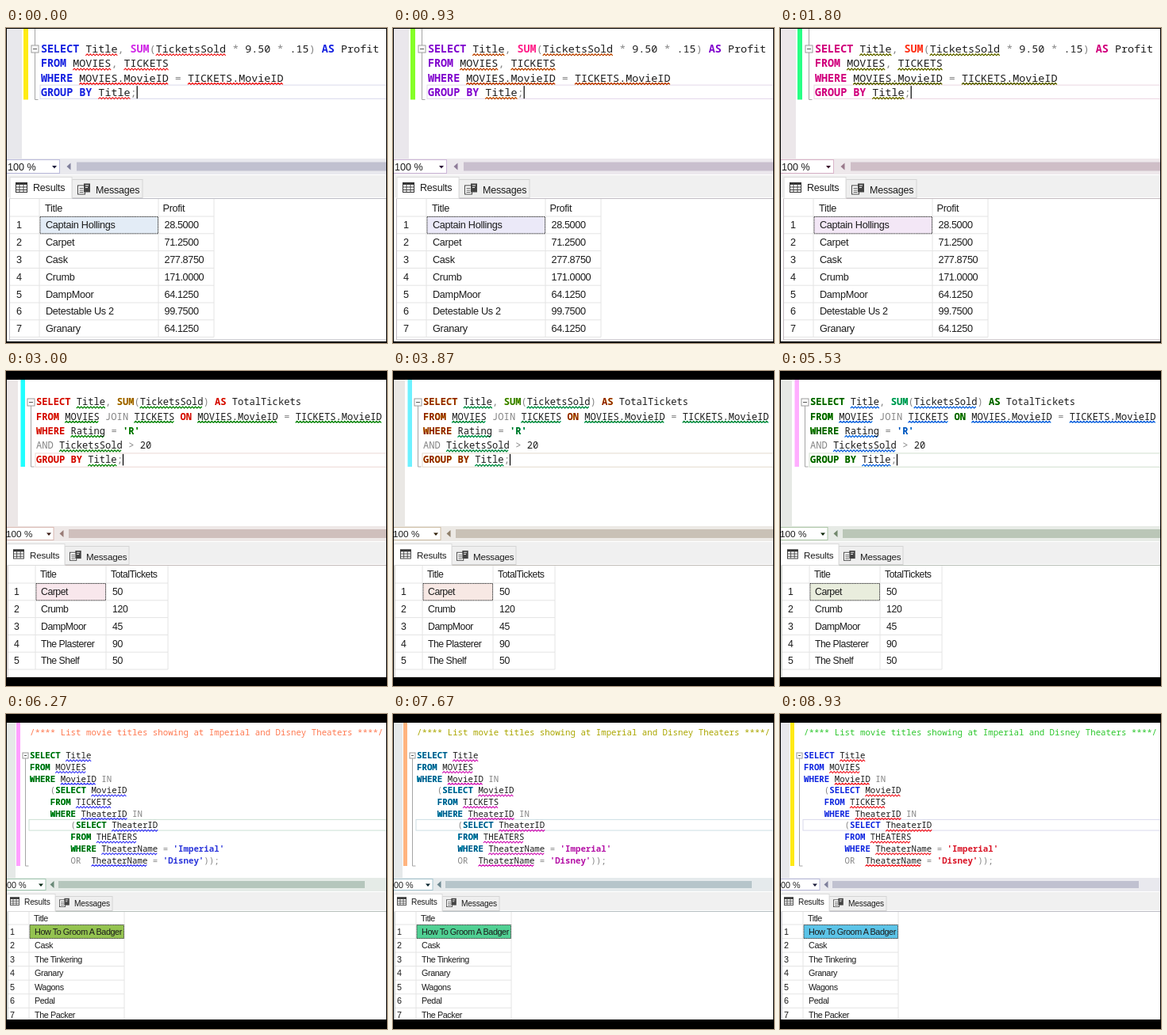
These frames come from a looping animation (480 px wide and 398 px high, 8990 ms). An HTML page:

```html
<!DOCTYPE html>
<html lang="en">
<head>
<meta charset="utf-8">
<title>SQL queries</title>
<style>
  html, body { margin: 0; width: 100%; height: 100%; overflow: hidden; background: #fff; }
  svg { display: block; width: 480px; height: 398px; }
  text { white-space: pre; }
  .code { font-family: "Noto Sans Mono", monospace; font-weight: 500; }
  .ui { font-family: "Liberation Sans", Arial, sans-serif; fill: #1c1c1c; }
  .keyword { fill: #1420e0; font-weight: 600; }
  .func { fill: #d028e6; font-weight: 600; }
  .op { fill: #858585; }
  .string { fill: #d8141e; font-weight: 600; }
  .comment { fill: #28c832; }
  .plain, .name { fill: #1c1c1c; }
</style>
</head>
<body>
<svg id="stage" viewBox="0 0 480 398"></svg>
<script>
const LOOP = 8990, STEPS = 135;

const slides = [
  {
    top: 1, bottom: 396,
    code: { x: 44, y: 31, size: 13.4, pitch: 18.3, caret: true, current: 3, lines: [
      "SELECT Title, SUM(TicketsSold * 9.50 * .15) AS Profit",
      "FROM MOVIES, TICKETS",
      "WHERE MOVIES.MovieID = TICKETS.MovieID",
      "GROUP BY Title;"] },
    gutter: 20, bar: [22, 6], fold: [36.5, 26.5, 4.5, 90.5], foldAbove: true,
    zoom: { y: 165, h: 20, text: 2, size: 12.6, combo: 67.5, arrow: 61, left: 79, thumb: [89, 479], thumbY: [169.5, 11] },
    tabs: { y: 186, bottom: 214, split: [5, 83, 172], text: [34, 113], base: [206, 208.5],
            icon: [12, 90], iconY: 195, scale: 1, size: 12.5 },
    table: { y: 216, head: 22, pitch: 21.8, cols: [4.5, 42, 192, 262], text: [13, 49, 197.5], size: 12.7, gap: -.3, numGap: -.4,
      frameBottom: 394, pick: "#e3ecf6", header: ["Title", "Profit"], rows: [
      ["Captain Hollings", "28.5000"], ["Carpet", "71.2500"], ["Cask", "277.8750"], ["Crumb", "171.0000"],
      ["DampMoor", "64.1250"], ["Detestable Us 2", "99.7500"], ["Granary", "64.1250"]] }
  },
  {
    top: 11, bottom: 387,
    code: { x: 38, y: 43.2, size: 12.1, pitch: 18.3, caret: true, current: 4, lines: [
      "SELECT Title, SUM(TicketsSold) AS TotalTickets",
      "FROM MOVIES JOIN TICKETS ON MOVIES.MovieID = TICKETS.MovieID",
      "WHERE Rating = 'R'",
      "AND TicketsSold > 20",
      "GROUP BY Title;"] },
    gutter: 15, bar: [18.5, 5.5], fold: [31.5, 39.5, 4.5, 121],
    zoom: { y: 196, h: 19, text: 0, size: 11.8, combo: 60, arrow: 54, left: 70, thumb: [79, 479], thumbY: [200, 11] },
    tabs: { y: 216, bottom: 244, split: [1, 74, 155], text: [30, 101], base: [236.5, 239],
            icon: [9, 80], iconY: 225.5, scale: .92, size: 11.6 },
    table: { y: 246, head: 22, pitch: 21.8, cols: [2, 37, 126, 204], text: [10, 43, 132], size: 12.3, gap: -.5, numGap: -.4,
      frameBottom: 387, pick: "#e3ecf6", header: ["Title", "TotalTickets"], rows: [
      ["Carpet", "50"], ["Crumb", "120"], ["DampMoor", "45"], ["The Plasterer", "90"], ["The Shelf", "50"]] }
  },
  {
    top: 11, bottom: 386,
    code: { x: 30, y: 26.6, size: 10.75, pitch: 14.73, current: 8, lines: [
      "/**** List movie titles showing at Imperial and Disney Theaters ****/",
      "",
      "SELECT Title",
      "FROM MOVIES",
      "WHERE MovieID IN",
      "    (SELECT MovieID",
      "    FROM TICKETS",
      "    WHERE TheaterID IN",
      "        (SELECT TheaterID",
      "        FROM THEATERS",
      "        WHERE TheaterName = 'Imperial'",
      "        OR  TheaterName = 'Disney'));"] },
    gutter: 12, bar: [13, 5], fold: [24.5, 52.5, 3.5, 192],
    zoom: { y: 207, h: 17, text: -5, size: 10.8, combo: 50, arrow: 44, left: 58, thumb: [66, 452], thumbY: [211, 9] },
    tabs: { y: 225, bottom: 248, split: [1, 62, 134], text: [23, 86], base: [241, 242.5],
            icon: [5, 67], iconY: 231.5, scale: .8, size: 10.2 },
    table: { y: 250, head: 16, pitch: 17.55, cols: [2, 29, 149], text: [5, 35], size: 10.8, gap: -.42, numGap: -.4,
      frameBottom: 387, pick: "#5fc3ec", header: ["Title"], rows: [
      ["How To Groom A Badger"], ["Cask"], ["The Tinkering"], ["Granary"], ["Wagons"], ["Pedal"], ["The Packer"]] }
  }
];

const rect = (x, y, w, h, fill, extra = "") =>
  `<rect x="${x}" y="${y}" width="${w}" height="${h}" fill="${fill}" ${extra}/>`;
const path = (d, stroke, width = 1) => `<path d="${d}" fill="none" stroke="${stroke}" stroke-width="${width}"/>`;
const shape = (d, fill) => `<path d="${d}" fill="${fill}"/>`;
const label = (x, y, size, str, gap = -.2) =>
  `<text class="ui" x="${x}" y="${y}" font-size="${size}" letter-spacing="${gap}">${str}</text>`;
const escape = s => s.replace(/&/g, "&amp;").replace(/</g, "&lt;").replace(/>/g, "&gt;");

const TOKENS = new RegExp([
  "(?<comment>/\\*.*\\*/)", "(?<string>'[^']*')",
  "(?<keyword>\\b(?:SELECT|FROM|WHERE|GROUP BY|AS|ON)\\b)", "(?<func>\\bSUM\\b)",
  "(?<op>\\b(?:AND|OR|IN|JOIN)\\b|[(),;=*>]+)",
  "(?<plain>(?<=AS )\\w+|[\\d.]+)", "(?<name>[A-Za-z][\\w.]*)"
].join("|"), "g");

function squiggle(x, y, width) {
  let d = `M${x} ${y + 1}`;
  for (let i = 1; i * 2 <= width; i++) d += `L${x + i * 2} ${y + (i % 2 ? -1 : 1)}`;
  return path(d, "#f01818", 1.1);
}

function drawCode({ x, y, size, pitch, lines, caret, current }) {
  const advance = size * .6;
  let out = rect(x - 1, y + current * pitch - size * 1.03, 500, pitch - 1, "none", 'stroke="#dadaec"');
  lines.forEach((line, row) => {
    const base = y + row * pitch;
    for (const match of line.matchAll(TOKENS)) {
      const kind = Object.keys(match.groups).find(k => match.groups[k]);
      const left = x + match.index * advance;
      if (kind === "name") out += squiggle(left, base + 2.8, match[0].length * advance);
      out += `<text class="code ${kind}" x="${left}" y="${base}" font-size="${size}">${escape(match[0])}</text>`;
    }
  });
  if (caret) {
    const base = y + (lines.length - 1) * pitch;
    out += rect(x + lines.at(-1).length * advance, base - size * .95, 1.2, size * 1.2, "#000");
  }
  return out;
}

function drawMargin({ top, gutter, bar, fold, foldAbove, zoom }) {
  const [x, y, r, end] = fold;
  return rect(1, top, gutter - 1, zoom.y - top, "#e8e8ec")
    + rect(bar[0], top, bar[1], end - top, "#ffec14")
    + path(`M${x} ${y + r}V${end}h4${foldAbove ? `M${x} ${top}V${y - r}` : ""}`, "#a5a5a5")
    + rect(x - r, y - r, 2 * r, 2 * r, "#fff", 'stroke="#999"')
    + path(`M${x - r + 2} ${y}h${2 * r - 4}`, "#555");
}

function drawZoom({ y, h, text, size, combo, arrow, left, thumb, thumbY }) {
  const mid = y + h / 2;
  return rect(1, y, 478, h, "#e9e9ee")
    + rect(0, y + 1.5, combo, h - 3, "#fff", 'stroke="#bcbcdc"')
    + label(text, mid + size * .38, size, "100 %", 0)
    + shape(`M${arrow - 3} ${mid - 1}h6l-3 3.5z`, "#1c1c3c")
    + shape(`M${left + 2.5} ${mid - 4.5}v9l-5 -4.5z`, "#80809c")
    + rect(thumb[0], thumbY[0], thumb[1] - thumb[0], thumbY[1], "#c1c1d0");
}

const gridIcon = rect(.5, .5, 14, 12, "#fff", 'stroke="#333"') + rect(0, 0, 15, 3, "#333")
  + path("M5 1V12M10 1V12M1 6H14M1 9.5H14", "#444");
const messageIcon = rect(.5, 3.5, 9, 11, "#fff", 'stroke="#444"') + path("M2.5 7h5M2.5 9.5h5M2.5 12h5", "#555")
  + rect(8, 1, 8, 11, "#444") + path("M10 3.5h4M10 6h3", "#fff");

function drawTabs({ y, bottom, split, text, base, icon, iconY, scale, size }) {
  const [a, b, c] = split;
  const place = (x, dy, art) => `<g transform="translate(${x} ${iconY + dy}) scale(${scale})">${art}</g>`;
  return rect(1, y, 478, bottom - y, "#f0f0f0")
    + rect(b, y + 5.5, c - b, bottom - y - 5, "#efefef", 'stroke="#d4d4d4"')
    + rect(a, y + 2.5, b - a, bottom - y - 1, "#fff", 'stroke="#dcdcdc"')
    + place(icon[0], 0, gridIcon) + place(icon[1], .5, messageIcon)
    + label(text[0], base[0], size, "Results") + label(text[1], base[1], size, "Messages");
}

function drawTable({ y, head, pitch, cols, text, size, gap, numGap, frameBottom, pick, header, rows }) {
  const first = y + head, right = cols.at(-1), bottom = Math.min(first + rows.length * pitch, frameBottom);
  let out = rect(1, y - 2, 478, 400, "#fff");
  let lines = "";
  for (let i = 0; i <= rows.length; i++) lines += `M${cols[0]} ${first + i * pitch}H${right}`;
  for (const x of cols) lines += `M${x} ${y}V${bottom}`;
  out += path(lines, "#e4e4e4")
    + path(`M480 ${y - .5}H${cols[0]}V${frameBottom}H480`, "#bcbcc4")
    + rect(cols[1] + 1, first + .5, cols[2] - cols[1] - 1.5, pitch - .5, pick, 'stroke="#333" stroke-dasharray="1.3 .8"');
  header.forEach((str, i) => out += label(text[i + 1], y + head / 2 + size * .36, size, str, gap));
  rows.forEach((row, i) => {
    const base = first + (i + .5) * pitch + size * .35;
    out += label(text[0], base, size, i + 1, numGap) + label(text[1] + 1, base, size, row[0], gap);
    if (row[1]) out += label(text[2] + 2, base, size, row[1], numGap);
  });
  return out;
}

const drawSlide = s => "<g>" + rect(0, 0, 480, 398, "#fff")
  + drawCode(s.code) + drawMargin(s) + drawZoom(s.zoom) + drawTable(s.table) + drawTabs(s.tabs)
  + rect(0, 0, 480, s.top, "#000") + rect(0, s.bottom, 480, 398 - s.bottom, "#000")
  + rect(0, 0, 1, 398, "#000") + rect(479, 0, 1, 398, "#000") + "</g>";

const stage = document.getElementById("stage");
stage.innerHTML = slides.map(drawSlide).join("");
const groups = [...stage.children];

// The hue makes one full turn per loop while the slides cut every third of it.
function render() {
  const step = Math.floor(performance.now() % LOOP * STEPS / LOOP);
  const active = Math.floor(step * slides.length / STEPS);
  groups.forEach((g, i) => g.style.display = i === active ? "" : "none");
  stage.style.filter = `hue-rotate(${step * 360 / STEPS}deg)`;
  requestAnimationFrame(render);
}
render();
</script>
</body>
</html>
```
